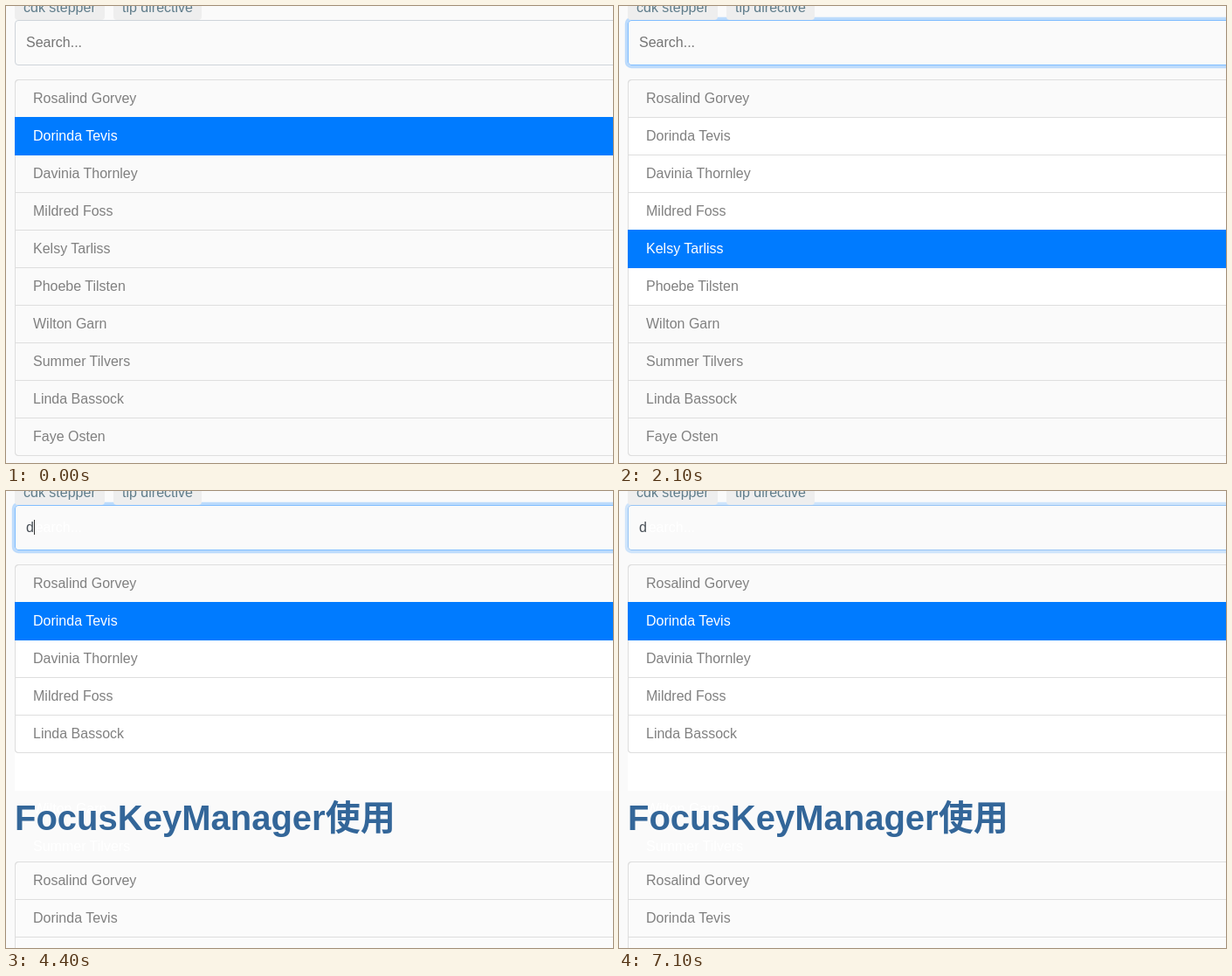
An HTML page that plays this animation: 695 px wide and 523 px high, repeating every 7.2 s.

```html
<!DOCTYPE html>
<html lang="en">
<head>
<meta charset="utf-8">
<title>Keyboard list navigation</title>
<style>
  html, body { margin: 0; width: 100%; height: 100%; overflow: hidden; background: #fafafa; }
  svg { display: block; width: 695px; height: 523px; }
  text { font: 16px "Liberation Sans", Arial, sans-serif; white-space: pre; }
  .title { font: bold 40px "Liberation Sans", "Noto Sans CJK SC", "Noto Sans CJK", sans-serif; }
</style>
</head>
<body>
<svg id="stage" viewBox="0 0 695 523" xmlns="http://www.w3.org/2000/svg"></svg>
<script>
const stage = document.getElementById("stage");
const LOOP = 7200, TICK = 100, BLINK = 500;
const ROW = 43, LIST_TOP = 84, EDGE = 10, WIDTH = 685;
const PAGE = "#fafafa", LINE = "#dedede", BLUE = "#007bff", GREY = "#808080", INK = "#495057";

const people = ["Rosalind Gorvey", "Dorinda Tevis", "Davinia Thornley", "Mildred Foss",
  "Kelsy Tarliss", "Phoebe Tilsten", "Wilton Garn", "Summer Tilvers", "Linda Bassock", "Faye Osten"];
const matches = people.filter(name => name.toLowerCase().includes("d"));

const FOCUS_AT = 800, TYPED_AT = 4300, FILTERED_AT = 4400, HOME_AT = 5200;
const caretResets = [FOCUS_AT, 1400, 4100, TYPED_AT, HOME_AT];

// Evenly spaced arrow keys: v moves down, ^ moves up.
const bursts = [
  { start: 1500, every: 157, keys: "vvvv^^^^" },
  { start: 4600, every: 0, keys: "v" },
  { start: 4960, every: 185, keys: "vv^^^" },
];
const presses = bursts.flatMap(({ start, every, keys }) => [...keys].map((key, i) => ({
  time: Math.round((start + i * every) / TICK) * TICK,
  move: key === "v" ? 1 : -1,
})));

function selection(t) {
  let active = 1, furthest = 1;
  for (const { time, move } of presses) {
    if (time > t) break;
    active += move;
    furthest = Math.max(furthest, active);
  }
  return { active, furthest };
}

const focusLevel = t => Math.max(0, Math.min(1, (t - 700) / 200, (7240 - t) / 200));

function caretVisible(t) {
  const reset = caretResets.filter(time => time <= t).pop();
  return reset !== undefined && Math.floor((t - reset) / BLINK) % 2 === 0;
}

const rect = (x, y, w, h, fill, extra = "") =>
  `<rect x="${x}" y="${y}" width="${w}" height="${h}" fill="${fill}" ${extra}/>`;
const label = (x, y, str, fill, cls = "") =>
  `<text x="${x}" y="${y}" fill="${fill}" class="${cls}">${str}</text>`;
const mix = (a, b, k) => `rgb(${a.map((v, i) => Math.round(v + (b[i] - v) * k))})`;

function list(top, names, active, rowFill) {
  const outline = fill =>
    rect(EDGE + 0.5, top + 0.5, 800, names.length * ROW, fill, `rx="3.5" stroke="${LINE}"`);
  const rowTop = i => top + i * ROW;
  const backs = names.map((_, i) => i === 0 ? ""
    : rect(EDGE + 1, rowTop(i), WIDTH, ROW, rowFill(i), i === names.length - 1 ? 'rx="3"' : "")
      + rect(EDGE + 1, rowTop(i), WIDTH, 1, LINE));
  const fronts = names.map((name, i) =>
    (i === active ? rect(EDGE, rowTop(i), WIDTH, ROW + 1, BLUE) : "")
    + label(31, rowTop(i) + 27, name, i === active ? "#fff" : GREY));
  return outline(rowFill(0)) + backs.join("") + outline("none") + fronts.join("");
}

const chip = (x, w, str) =>
  rect(x, -16, w, 32, "#eee", 'rx="4"') + label(x + 10, 7, str, "#607d8b");

const focusRing = level => rect(8.4, 14.4, 800, 55.2, "none",
  `rx="5.6" stroke="${BLUE}" stroke-width="3.2" stroke-opacity="${0.25 * level}"`);

function searchBox(t) {
  const typed = t >= TYPED_AT;
  const border = mix([206, 212, 218], [128, 189, 255], focusLevel(t));
  const content = typed
    ? label(33.7, 47, "earch...", "#fff") + label(23, 47, "d", INK)
    : label(23, 47, "Search...", "#757575");
  const caretX = typed && t < HOME_AT ? 32 : 23;
  return rect(EDGE + 0.5, 16.5, 800, 51, PAGE, `rx="3.5" stroke="${border}"`) + content
    + (caretVisible(t) ? rect(caretX, 33, 1, 17, "#333") : "");
}

function results(t) {
  const { active, furthest } = selection(t);
  const rowFill = i => i > 0 && i <= furthest ? "#fff" : PAGE;
  if (t < FILTERED_AT) return list(LIST_TOP, people, active, rowFill);

  const ghosts = [6, 7].map(i => label(31, LIST_TOP + i * ROW + 27, people[i], "#fff"));
  return rect(EDGE, LIST_TOP + 5 * ROW, WIDTH, ROW + 1, "#fff")
    + list(LIST_TOP, matches, active, rowFill) + ghosts.join("")
    + label(EDGE, 388, "FocusKeyManager使用", "#336699", "title")
    + list(424, people, -1, () => "#fbfbfb");
}

let shown = "";
function draw(t) {
  const markup = rect(0, 0, 695, 523, PAGE) + focusRing(focusLevel(t))
    + chip(10, 103, "cdk stepper") + chip(123, 101, "tip directive")
    + searchBox(t) + results(t);
  if (markup !== shown) stage.innerHTML = shown = markup;
}

const begin = performance.now();
function tick() {
  const t = (performance.now() - begin) % LOOP;
  draw(Math.floor(t / TICK) * TICK);
  requestAnimationFrame(tick);
}
tick();
</script>
</body>
</html>
```
